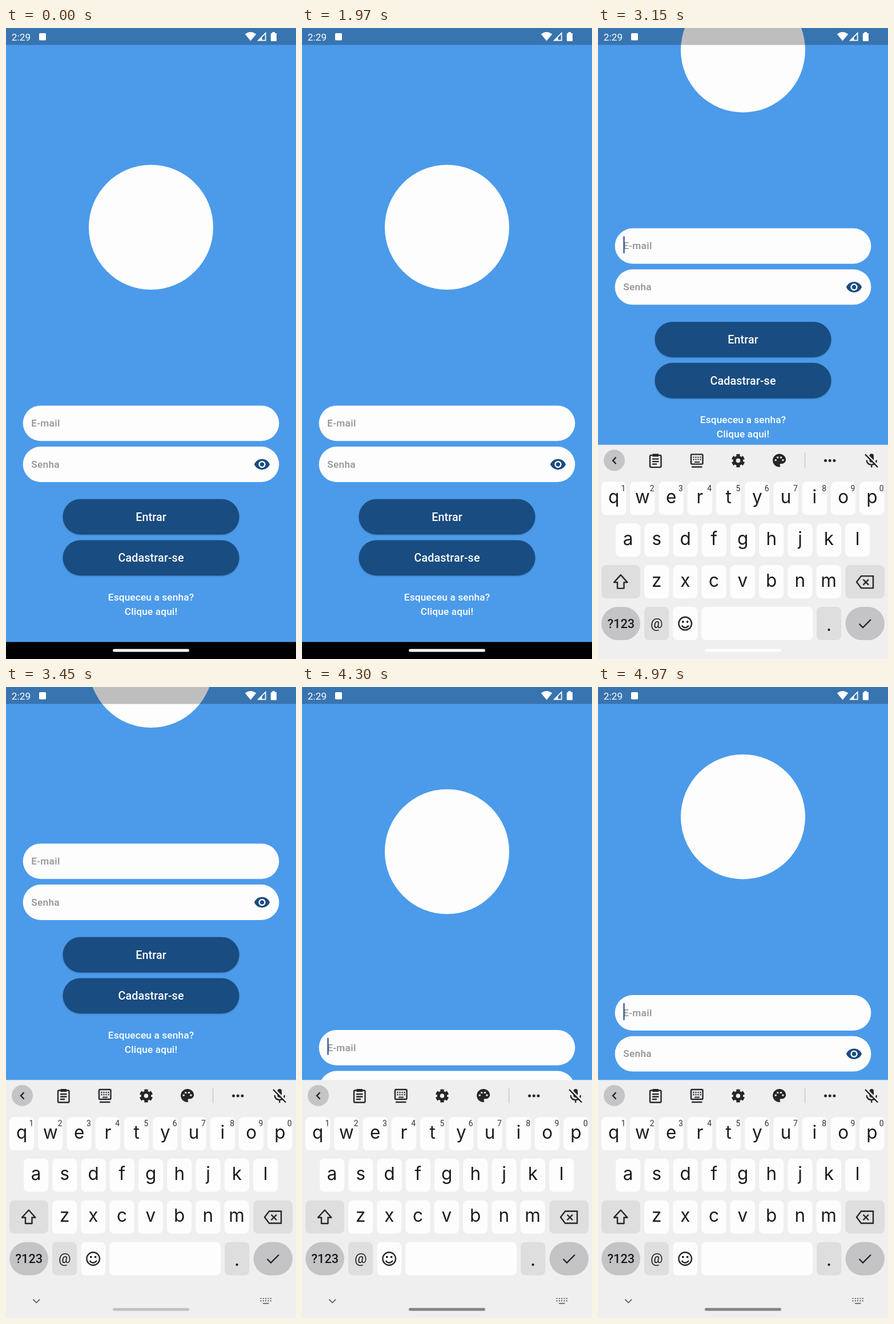
These frames come from a looping animation (508 px wide and 1102 px high, 5.03 s). An HTML page:

```html
<!DOCTYPE html>
<html lang="pt">
<head>
<meta charset="utf-8">
<title>Login</title>
<style>
  html, body { margin: 0; width: 100%; height: 100%; overflow: hidden; background: #4b9bea; }
  svg { display: block; width: 100vw; height: 100vh; }
  text { font-family: Roboto, sans-serif; }
  .center { text-anchor: middle; }
  .field { fill: #fefdfe; }
  .hint { font-size: 17.28px; font-weight: 500; letter-spacing: .3px; fill: #929295; }
  .button { fill: #194c80; filter: drop-shadow(0 1.5px 1.2px rgba(0, 0, 0, .25)); }
  .label { font-size: 19.76px; font-weight: 500; letter-spacing: .12px; fill: #fff; }
  .link { font-size: 17.28px; font-weight: 500; letter-spacing: .12px; fill: #fff; }
  .letter { font: 31.5px Inter, sans-serif; fill: #1c1c1e; }
  .digit { font-size: 14px; fill: #333; }
  .line { fill: none; stroke: #262628; stroke-width: 2.4; }
</style>
</head>
<body>
<svg viewBox="0 0 508 1102" preserveAspectRatio="none">
  <rect width="508" height="1102" fill="#4b9bea"/>

  <g id="content">
    <circle cx="254" cy="348" r="109" fill="#fefdfe"/>
    <rect class="field" x="29.65" y="659.4" width="448.7" height="61.8" rx="30.9"/>
    <rect class="field" x="29.65" y="731.1" width="448.7" height="61.8" rx="30.9"/>
    <text class="hint" x="44.2" y="696">E-mail</text>
    <text class="hint" x="44.2" y="767.8">Senha</text>
    <rect id="cursor" x="44.2" y="673.5" width="2.6" height="29.5" fill="#48639f"/>
    <path transform="translate(433.7 747.3) scale(1.235)" fill="#194c80" fill-rule="evenodd"
      d="M12 4.5C7 4.5 2.73 7.61 1 12c1.73 4.39 6 7.5 11 7.5s9.27-3.11 11-7.5c-1.73-4.39-6-7.5-11-7.5zM12 17a5 5 0 1 1 0-10a5 5 0 0 1 0 10zm0-8a3 3 0 1 0 0 6a3 3 0 0 0 0-6z"/>
    <rect class="button" x="99.5" y="822.7" width="309" height="61.8" rx="30.9"/>
    <rect class="button" x="99.5" y="894.4" width="309" height="61.8" rx="30.9"/>
    <text class="label center" x="254" y="860.6">Entrar</text>
    <text class="label center" x="254" y="932.3">Cadastrar-se</text>
    <text class="link center" x="254" y="1000">Esqueceu a senha?</text>
    <text class="link center" x="254" y="1024.7">Clique aqui!</text>
  </g>

  <!-- status bar -->
  <rect width="508" height="29.6" fill="#000" opacity=".25"/>
  <g fill="#fff">
    <text x="9.8" y="21.5" font-size="17.28">2:29</text>
    <rect x="58" y="9" width="12" height="12.5" rx="1.5"/>
    <path d="M418.8 10.8Q428.5 3 438.2 10.8L428.5 22.5Z"/>
    <path fill-rule="evenodd" d="M455.5 6.8V22.5H439.8ZM453.8 11V20.8H448.5V16.3Z"/>
    <path d="M466.5 7H471V9H472.7Q474 9 474 10.3V21.5Q474 23 472.7 23H465.2Q463.8 23 463.8 21.5V10.3Q463.8 9 465.2 9H466.5Z"/>
  </g>

  <rect y="1072.3" width="508" height="30" fill="#000"/>

  <g id="keyboard">
    <rect y="686.3" width="508" height="417" fill="#efeff0"/>
    <g id="keys"></g>

    <!-- toolbar -->
    <circle cx="28.5" cy="713.5" r="18.5" fill="#c4c4c6"/>
    <path class="line" d="M31.5 708L26 713.8L31.5 719.6"/>
    <g class="line">
      <rect x="91" y="704.5" width="19.5" height="21" rx="2"/>
      <path d="M95 711H106.5M95 715.5H106.5M95 720H103"/>
      <path d="M95.5 704.5H106" stroke-width="5"/>
      <rect x="163" y="703" width="20.5" height="17" rx="1.5"/>
      <path d="M164 725H182.5"/>
      <path d="M166.5 708H181M166.5 712H181" stroke-dasharray="2 2"/>
      <path d="M169 716.5H178" stroke-width="2"/>
      <circle cx="245.5" cy="714" r="6.3" stroke-width="5"/>
      <circle cx="245.5" cy="714" r="9.6" stroke-width="4" pathLength="60" stroke-dasharray="6 4" stroke-dashoffset="-2"/>
    </g>
    <g transform="translate(303.8 699.8) scale(1.15)">
      <path fill="#262628" d="M12 2C6.5 2 2 6.5 2 12s4.5 10 10 10c.8 0 1.5-.7 1.5-1.5 0-.4-.2-.7-.4-1-.2-.3-.4-.6-.4-1 0-.8.7-1.5 1.5-1.5H16c3.3 0 6-2.7 6-6 0-5-4.5-9-10-9z"/>
      <g fill="#efeff0">
        <circle cx="6.5" cy="11.5" r="1.5"/><circle cx="9.5" cy="7.5" r="1.5"/>
        <circle cx="14.5" cy="7.5" r="1.5"/><circle cx="17.5" cy="11.5" r="1.5"/>
      </g>
    </g>
    <path d="M362.5 700V727" stroke="#c9c9cb" stroke-width="1.5"/>
    <g fill="#262628">
      <circle cx="398.5" cy="714" r="2.5"/><circle cx="406.2" cy="714" r="2.5"/><circle cx="413.9" cy="714" r="2.5"/>
      <rect x="475.5" y="702" width="7.5" height="15" rx="3.7"/>
    </g>
    <path class="line" d="M470.5 713Q471.5 721 479.2 721Q487 721 488 713M479.2 721V726"/>
    <path d="M469.5 701.5L492 724" stroke="#efeff0" stroke-width="2.5"/>
    <path class="line" d="M468 703L490 725.5"/>

    <!-- special key symbols -->
    <path class="line" d="M39.8 913.5L51.5 926.5H45.5V937H34V926.5H28Z" stroke-linejoin="round"/>
    <path class="line" d="M461 915.5H482V936.5H461L453 926ZM464.5 921.5L474 931M474 921.5L464.5 931"/>
    <text class="center" x="40.3" y="1006" font-size="21.8" font-weight="500" fill="#1c1c1e">?123</text>
    <text class="center" x="102.7" y="1006" font-size="24" fill="#1c1c1e">@</text>
    <text class="letter center" x="404.5" y="1011">.</text>
    <circle class="line" cx="152.7" cy="998.5" r="11.3"/>
    <path class="line" d="M146.5 1002Q152.7 1009 159 1002" stroke-width="2"/>
    <circle cx="148.8" cy="995.5" r="1.8"/><circle cx="156.6" cy="995.5" r="1.8"/>
    <path class="line" d="M457.5 999L464 1005.5L478 991.5"/>

    <!-- navigation row -->
    <g fill="none" stroke="#626265" stroke-width="1.8">
      <path d="M47.5 1069.5L53.3 1075.3L59.1 1069.5"/>
      <path d="M445.5 1068H465M445.5 1072H465" stroke-dasharray="2 2.3"/>
      <path d="M450 1076.5H460.5"/>
    </g>
  </g>

  <rect id="pill" x="187" y="1084.5" width="134" height="5" rx="2.5"/>
</svg>

<script>
const LOOP = 5030;
const KEYBOARD_START = 2997.5, KEYBOARD_TIME = 285, KEYBOARD_HEIGHT = 416;
const NAV_HEIGHT = 30, CURSOR_START = 2940;
const $ = id => document.getElementById(id);
const clamp = x => Math.max(0, Math.min(1, x));

function buildKeys() {
  const pitch = 50.25, width = 43.2, height = 58;
  const key = (x, y, w = width, fill = '#fdfdfe', r = 8) =>
    `<rect x="${x}" y="${y}" width="${w}" height="${height}" rx="${r}" fill="${fill}"/>`;
  const letters = (word, left, top) => [...word].map((c, i) => {
    const x = left + i * pitch;
    return key(x, top) +
      `<text class="letter center" x="${x + width / 2}" y="${top + 37.5}">${c}</text>`;
  }).join('');
  const digits = [...'1234567890'].map((d, i) =>
    `<text class="digit center" x="${44.5 + i * pitch}" y="767">${d}</text>`).join('');
  const mid = '#dededf', dark = '#c4c4c6';
  $('keys').innerHTML =
    letters('qwertyuiop', 6, 751) + digits +
    letters('asdfghjkl', 31, 823.7) +
    letters('zxcvbnm', 81, 896.5) +
    key(6, 896.5, 68, mid) + key(433.5, 896.5, 68.5, mid) +
    key(6, 969.5, 68, dark, 29) + key(81, 969.5, width, mid) + key(131.3, 969.5) +
    key(181.2, 969.5, 195) + key(383, 969.5, width, mid) + key(433.5, 969.5, 68.5, dark, 29);
}

// cubic-bezier(.2, 0, 0, 1)
function emphasize(x) {
  x = clamp(x);
  let low = 0, high = 1, s = 0.5;
  for (let i = 0; i < 24; i++) {
    s = (low + high) / 2;
    if (0.6 * s * (1 - s) ** 2 + s ** 3 < x) low = s; else high = s;
  }
  return 3 * s * s * (1 - s) + s ** 3;
}

const keyboardRise = t => KEYBOARD_HEIGHT * emphasize((t - KEYBOARD_START) / KEYBOARD_TIME);

// finger drag: [time, content offset]
const drag = [[3640, -386], [3970, -262], [4300, -61], [4440, 0], [4600, 0], [4970, -121], [5030, -138]];
const slope = i => drag[i] && drag[i + 1]
  ? (drag[i + 1][1] - drag[i][1]) / (drag[i + 1][0] - drag[i][0]) : 0;
const tangent = i => slope(i - 1) * slope(i) <= 0 ? 0 : (slope(i - 1) + slope(i)) / 2;

function contentOffset(t) {
  if (t < drag[0][0]) return Math.min(0, NAV_HEIGHT - keyboardRise(t - 35));
  const i = drag.findIndex((p, k) => k + 1 < drag.length && t <= drag[k + 1][0]);
  const [t0, y0] = drag[i], [t1, y1] = drag[i + 1];
  const d = t1 - t0, u = (t - t0) / d, v = 1 - u;
  return v * v * (1 + 2 * u) * y0 + u * u * (1 + 2 * v) * y1 +
    d * u * v * (v * tangent(i) - u * tangent(i + 1));
}

function draw(now) {
  const t = now % LOOP;
  const shade = 255 - 123 * clamp((t - 3250) / 400);
  const blinkOn = t >= CURSOR_START && (t - CURSOR_START) % 1000 < 500;
  $('content').setAttribute('transform', `translate(0 ${contentOffset(t)})`);
  $('keyboard').setAttribute('transform', `translate(0 ${KEYBOARD_HEIGHT - keyboardRise(t)})`);
  $('cursor').setAttribute('visibility', blinkOn ? 'visible' : 'hidden');
  $('pill').setAttribute('fill', `rgb(${shade}, ${shade}, ${shade})`);
}

buildKeys();
const start = performance.now();
(function tick() {
  draw(performance.now() - start);
  requestAnimationFrame(tick);
})();
</script>
</body>
</html>
```
